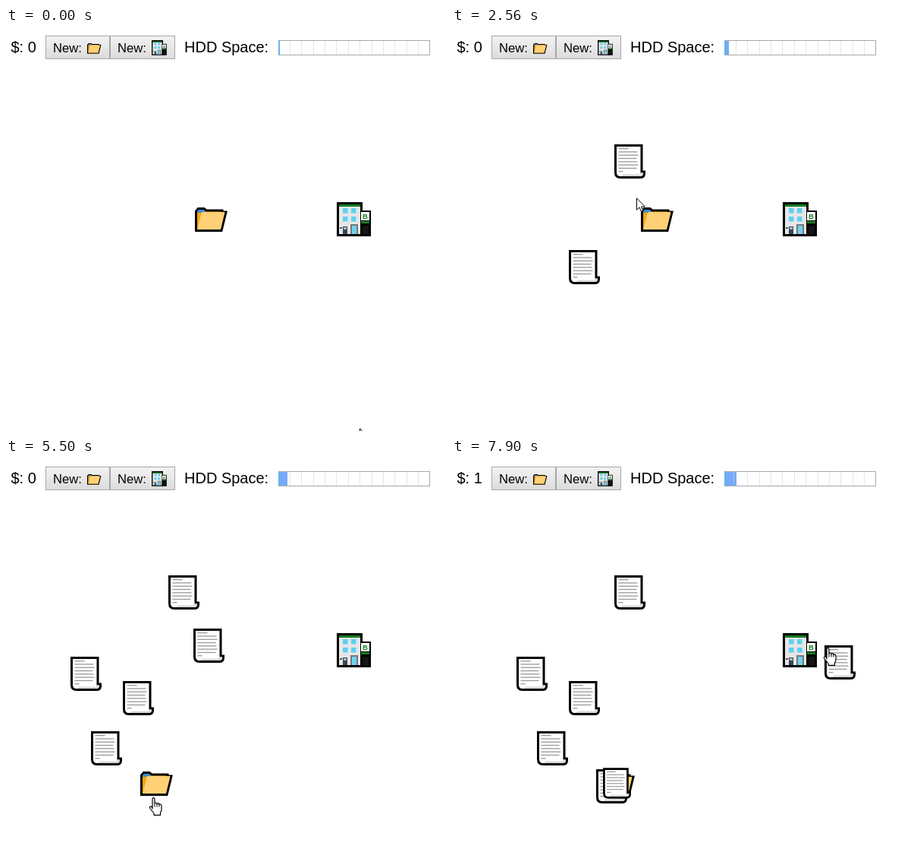
Animation of 580 by 530 pixels, one loop 7990 ms. Source, as an HTML page with a canvas:

```html
<!DOCTYPE html>
<html lang="en">
<head>
<meta charset="utf-8">
<style>
html, body { margin: 0; width: 100%; height: 100%; overflow: hidden; background: #fff; }
canvas { display: block; }
</style>
</head>
<body>
<canvas id="stage" width="580" height="530"></canvas>
<script>
const ctx = document.getElementById('stage').getContext('2d');
const LOOP = 7990, STEP = 77.5;
const FONT = '"Liberation Sans", Arial, sans-serif';
const BANK = [436, 229];
const SALE = 87;

// Tracks hold [step, x, y] points; the gestures below extend them.
const cursorTrack = [[0, 466, 526]];
const folderTrack = [[0, 249, 236]];
const papers = [];
const end = track => track[track.length - 1].slice(1);

function point(step, x, y) {
  cursorTrack.push([step, x, y]);
}

function drag(track, from, to, x, y, gripX, gripY) {
  const [x0, y0] = end(track);
  track.push([from, x0, y0], [to, x, y]);
  point(from, x0 + gripX, y0 + gripY);
  point(to, x + gripX, y + gripY);
}

// A new paper appears on top of the folder.
function newPaper(born, shrinks = false) {
  const [x, y] = end(folderTrack);
  const paper = { born, shrinks, sold: Infinity, track: [[born, x - 1, y - 8]] };
  papers.push(paper);
  return paper;
}

function dragPaper(paper, from, to, x, y, gripX = 15, gripY = 22) {
  drag(paper.track, from, to, x, y, gripX, gripY);
}

// The grip slides a little with every click that makes a paper.
function dragFolder(from, to, x, y) {
  drag(folderTrack, from, to, x, y, 2 + 3 * papers.length, 34);
}

dragPaper(newPaper(11), 12, 18, 154, 292);
point(23, 242, 254);
dragPaper(newPaper(25), 26, 32, 214, 153);
dragFolder(34, 35, 248, 231);
const goods = newPaper(35);
dragFolder(36, 42, 119, 223);
dragFolder(42, 49, 86, 268);
newPaper(50);
dragFolder(51, 57, 85, 334);
dragFolder(57, 62, 113, 366);
newPaper(62);
dragFolder(63, 71, 177, 411);
dragFolder(71, 73, 191, 416);
newPaper(75);
dragFolder(75, 78, 198, 412);
dragPaper(goods, 85, 86, 355, 220);
goods.sold = SALE;
newPaper(SALE, true);
point(89, 139, 344);
point(91, 125, 352);
dragPaper(newPaper(96), 96, 102, 491, 245, 4, 3);

function at(track, step) {
  const next = track.findIndex(p => p[0] > step);
  if (next < 0) return end(track);
  const [k0, x0, y0] = track[Math.max(next - 1, 0)], [k1, x1, y1] = track[next];
  const u = Math.max(0, (step - k0) / (k1 - k0 || 1));
  return [Math.round(x0 + (x1 - x0) * u), Math.round(y0 + (y1 - y0) * u)];
}

function place(draw, [x, y], scale = 1) {
  ctx.save();
  ctx.translate(x, y);
  ctx.scale(scale, scale);
  draw();
  ctx.restore();
}

function rect(x, y, w, h, color) {
  ctx.fillStyle = color;
  ctx.fillRect(x, y, w, h);
}

function shape(d, fill, stroke, width = 1) {
  const path = new Path2D(d);
  if (fill) { ctx.fillStyle = fill; ctx.fill(path); }
  if (stroke) { ctx.strokeStyle = stroke; ctx.lineWidth = width; ctx.stroke(path); }
}

function text(s, x, y, size, color = '#000', weight = '') {
  ctx.font = `${weight} ${size}px ${FONT}`;
  ctx.fillStyle = color;
  ctx.fillText(s, x, y);
}

function folder() {
  shape('M1.5 30.5V5L4.5 1.5H12L15 4H36V6H41L35 30.5Z', '#f5a70c', '#000', 3);
  shape('M3 7V5L5 3H12L14 6.5Z', '#3c8bd0');
  shape('M9 6H39.5L33.8 29H3Z', '#ffd076');
}

function paper() {
  shape('M1.5 1.5H36V36H39.5V39Q39 43.5 34 43.5H8Q1.5 43.5 1.5 37Z', '#fff', '#000', 3);
  shape('M11 39.5H34V37.5H38V39Q37.5 42 34 42H8Q11 42 11 39.5Z', '#d9d9dd');
  for (let i = 0; i < 8; i++) {
    const width = i === 0 ? 13 : i === 7 ? 6 : 24 + i % 3;
    rect(5.5, 5 + 4.3 * i, width, 1.3, '#999');
  }
}

function bank() {
  rect(0, 0, 34, 45, '#000');
  rect(3, 6, 28, 36, '#e6e6e6');
  rect(3, 3, 28, 3, '#167d22');
  for (const x of [8, 19]) for (const y of [8, 19]) rect(x, y, 6.5, 6.5, '#5dd0f4');
  rect(18, 29, 10, 13, '#777');
  rect(20, 31, 6, 11, '#6fd2ef');
  rect(8, 32, 6, 10, '#32465a');
  rect(9, 33, 4, 3, '#a9b7c2');
  rect(4, 33, 3, 2, '#555');
  rect(31, 11, 14, 34, '#000');
  rect(32, 13, 11, 11, '#fff');
  rect(32, 25, 11, 3, '#167d22');
  rect(34, 31, 8, 11, '#151515');
  text('B', 34, 22, 9.5, '#167d22', 'bold');
}

function arrow() {
  shape('M.5 .8V16.2L4 12.8L6.4 18.3L8.8 17.2L6.5 12H11.4Z', '#fff', '#000');
}

function hand() {
  ctx.lineJoin = 'round';
  ctx.translate(-5.5, 0);
  shape('M4.5 15V2.5Q4.5 .7 6 .7T7.5 2.5V8.5Q7.5 7 9 7T10.5 9Q10.5 7.7 12 7.7T13.4 9.7' +
    'Q14 8.7 15 9T16.5 11V16Q16.5 18 15 20V23.3H6.5V21L1.3 14.5Q.3 12.5 1.8 12T4.5 14Z',
    '#fff', '#000', 1.2);
  shape('M7.5 8.5V12.5M10.5 9V12.5M13.4 9.7V12.5', null, '#000');
}

function button(x, w) {
  const shade = ctx.createLinearGradient(0, 11, 0, 40);
  shade.addColorStop(0, '#f2f2f2');
  shade.addColorStop(1, '#dcdcdc');
  rect(x, 10, w, 31, '#a6a6a6');
  rect(x + 1, 11, w - 2, 29, shade);
  text('New:', x + 10, 32, 16.67);
}

function meter(count) {
  const width = 1 + 2 * count;
  rect(359, 16, 200, 20, '#a9a9a9');
  rect(360, 17, 198, 18, '#fff');
  for (let i = 1; i < 13; i++) rect(Math.floor(359 + 200 / 13 * i), 17, 1, 18, '#e6e6e6');
  rect(360, 17, width, 18, '#78a9fb');
  rect(359, 17, Math.min(width, 3), 18, '#62b5e8');
  if (width > 11) rect(371, 17, 1, 18, '#a5bfe0');
}

// Each item reacts to the cursor in a box somewhat taller than its drawing.
const covers = ([left, top], [x, y]) =>
  x > left - 3 && x < left + 46 && y > top - 16 && y < top + 50;

function render(now) {
  const step = Math.floor((now % LOOP) / STEP + 0.3);
  const alive = papers.filter(p => step >= p.born && step < p.sold);
  const folderSpot = at(folderTrack, step), cursor = at(cursorTrack, step);
  const items = [BANK, folderSpot, ...alive.map(p => at(p.track, step))];

  rect(0, 0, 580, 530, '#fff');
  button(52, 85);
  button(137, 86);
  place(folder, [107, 20], 0.43);
  place(bank, [192, 16], 0.44);
  text('$: ' + (step >= SALE ? 1 : 0), 6.5, 32, 20);
  text('HDD Space:', 235, 32, 20);
  meter(alive.length);

  place(folder, folderSpot);
  place(bank, BANK);
  for (const p of alive) {
    const [x, y] = at(p.track, step);
    const scale = p.shrinks ? 0.96 - (step - p.born) * 0.004 : 1;
    place(paper, [x + 20.5 * (1 - scale), y + 22.5 * (1 - scale)], scale);
  }
  place(items.some(spot => covers(spot, cursor)) ? hand : arrow, cursor);
}

function tick() {
  render(performance.now());
  requestAnimationFrame(tick);
}
tick();
</script>
</body>
</html>
```
